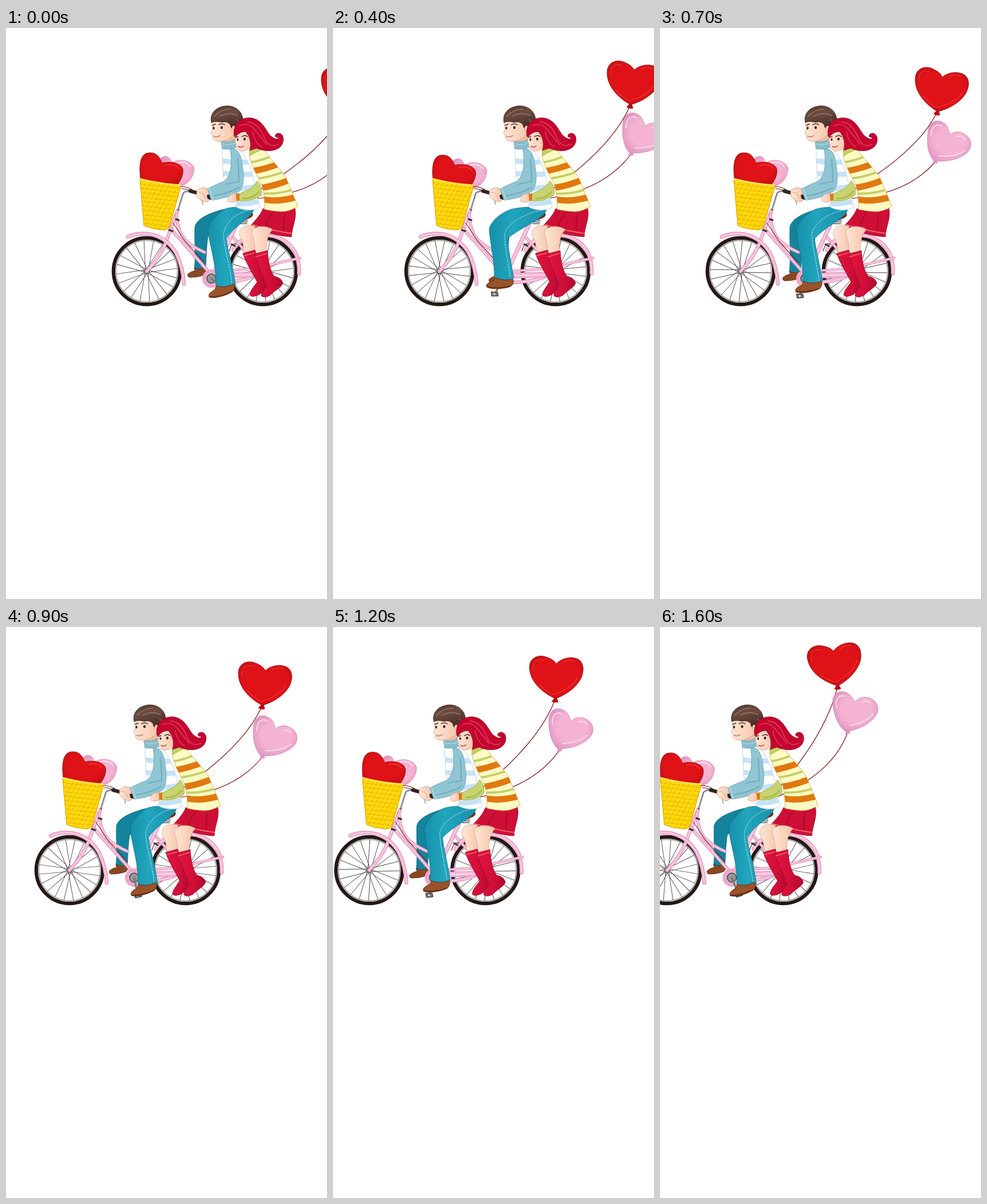
Write an HTML page that moves like this. It is 561 px wide and 998 px high and loops after 1.7 s.

```html
<!DOCTYPE html>
<html lang="en">
<head>
<meta charset="utf-8">
<title>Bicycle ride</title>
<style>
html, body { margin: 0; width: 100%; height: 100%; overflow: hidden; background: #fff; }
svg { display: block; width: 100vw; height: 100vh; }
</style>
</head>
<body>
<svg viewBox="0 0 561 998" fill="none" stroke-linecap="round" stroke-linejoin="round">
<defs>
  <radialGradient id="redFill" cx=".5" cy=".45" r=".6"><stop offset=".7" stop-color="#de1217"/><stop offset="1" stop-color="#c01015"/></radialGradient>
  <radialGradient id="pinkFill" cx=".52" cy=".48" r=".6"><stop offset=".55" stop-color="#f5b3d3"/><stop offset="1" stop-color="#e096c1"/></radialGradient>
  <linearGradient id="jeans"><stop offset="0" stop-color="#1591ab"/><stop offset=".4" stop-color="#22a5bd"/><stop offset="1" stop-color="#1890aa"/></linearGradient>
  <linearGradient id="boot"><stop offset="0" stop-color="#e0163f"/><stop offset=".6" stop-color="#d00d38"/><stop offset="1" stop-color="#ad0a2e"/></linearGradient>
  <linearGradient id="skin" x2="1"><stop offset="0" stop-color="#fee6d6"/><stop offset="1" stop-color="#f6c3a8"/></linearGradient>
  <linearGradient id="hairM" x2=".3" y2="1"><stop offset="0" stop-color="#54382f"/><stop offset=".4" stop-color="#6b4c40"/><stop offset="1" stop-color="#412821"/></linearGradient>
  <clipPath id="basketClip"><path d="M69 264Q105 273 141 275L121 347Q118 353 109 353Q88 351 76 345Z"/></clipPath>
  <clipPath id="knitClip"><path id="knit" d="M260 221Q272 214 285 211C294 227 314 245 324 261Q335 286 345 312Q330 321 316 321Q300 320 287 317Q288 297 283 277C276 259 264 245 260 221Z"/></clipPath>
  <clipPath id="vestClip"><path id="vest" d="M213 209L238 208C256 222 266 250 270 275L278 313C268 321 246 319 236 312L243 288L222 268L215 262Z"/></clipPath>
  <g id="wheel">
    <circle r="58.2" stroke="#231815" stroke-width="6.2"/>
    <circle r="53.8" stroke="#a9a5a4" stroke-width="2"/>
  </g>
</defs>
<g id="ride">
  <path id="redString" stroke="#7d1214" stroke-width="1.2"/>
  <path id="pinkString" stroke="#7d1214" stroke-width="1.2"/>
  <g id="redBalloon">
    <path d="M405 124L400 131Q406 134 412 132L409 124Z" fill="#b80f15"/>
    <path d="M407 126C389 118 363 99 362 72C361 55 377 47 392 53C401 56 406 60 409 65C416 57 430 53 440 55C453 57 458 68 455 82C451 101 430 118 407 126Z" fill="url(#redFill)" stroke="#8f1a16" stroke-width=".8"/>
    <path d="M369 76C366 61 376 55 387 59M421 63Q433 56 441 61M379 101Q390 114 405 119Q436 108 447 88" stroke="#f0473f" stroke-width="1.5" opacity=".6"/>
  </g>
  <g id="pinkBalloon">
    <path d="M414 216L411 222Q416 224 421 220L418 216Z" fill="#e295bf"/>
    <path d="M413 217C401 206 397 186 398 166C399 149 412 143 424 150C432 154 434 163 437 169C444 161 456 161 465 167C478 175 477 190 469 198C456 211 435 218 413 217Z" fill="url(#pinkFill)" stroke="#cf83ae" stroke-width=".8"/>
    <path d="M404 174C402 158 413 151 421 156M449 171Q459 168 464 175M465 194Q452 207 421 208" stroke="#fbd9ea" stroke-width="2"/>
  </g>

  <use href="#wheel" x="81" y="425"/><g class="spokes" data-x="81"></g>
  <use href="#wheel" x="284" y="425"/><g class="spokes" data-x="284"></g>
  <path id="farLeg" fill="#14839b" stroke="#0d6b80" stroke-width=".8"/>
  <g id="farShoe"><path d="M165 423Q174 428 184 423Q187 432 181 436Q170 440 156 440Q151 438 153 434Q157 430 165 428Z" fill="#8a4724" stroke="#5f2c14" stroke-width=".8"/></g>

  <g id="frame"></g>
  <path d="M227 333C234 328 250 327 265 323Q270 327 262 332Q247 338 229 341Q224 338 227 333Z" fill="#742c1c"/>
  <path d="M244 336h13M243 339h14M244 342h12" stroke="#555" stroke-width="1.4"/>
  <circle cx="194" cy="438" r="13" fill="#ddd" stroke="#efa5cb" stroke-width="6"/>
  <circle cx="194" cy="438" r="8" fill="#999" stroke="#555" stroke-width="2"/>
  <path id="crank" stroke="#777" stroke-width="3"/>
  <g id="pedal"><path d="M-6 -3L5 -4L7 2L-4 4Z" fill="#777" stroke="#444" stroke-width="1.5"/><circle r="2" fill="#ccc"/></g>

  <g id="cargo">
    <path d="M103 231C109 221 122 222 125 236C135 227 159 230 164 245C163 262 154 271 143 276L110 262Z" fill="url(#pinkFill)" stroke="#d58bb5" stroke-width=".7"/>
    <path d="M134 236Q150 231 157 242" stroke="#fbd9ea" stroke-width="2.5"/>
    <path d="M70 264C67 240 69 218 86 218C98 217 104 226 108 236C120 232 140 235 144 246C146 257 140 267 134 275Z" fill="url(#redFill)" stroke="#9a1712" stroke-width=".8"/>
    <path d="M115 240Q131 236 138 246" stroke="#ee433c" stroke-width="1.3"/>
  </g>
  <g clip-path="url(#basketClip)"><path d="M60 255h90v105h-90z" fill="#ffd90a"/><g id="weave"></g></g>
  <path d="M69 264Q105 273 141 275L121 347Q118 353 109 353Q88 351 76 345Z" stroke="#e0a500" stroke-width="1.2"/>
  <path d="M70 264Q105 273 140 275" stroke="#ffe34b" stroke-width="3"/>

  <path d="M140 277Q153 277 162 284M142 281Q152 281 160 286" stroke="#701b1c" stroke-width="1.2"/>
  <path d="M136 318L145 289Q150 284 163 285L184 292" stroke="#666" stroke-width="3"/>
  <path d="M137 316L146 289Q150 285 163 285" stroke="#ddd" stroke-width="1.2"/>
  <path d="M157 285L168 288M189 294L196 297" stroke="#2b2523" stroke-width="6"/>
  <path d="M177 300L179 308" stroke="#999" stroke-width="1.5"/>

  <path id="nearLeg" fill="url(#jeans)" stroke="#0f7289" stroke-width=".8"/>
  <path id="seam" stroke="#b9e3ea" stroke-width="1" stroke-dasharray="3 2"/>
  <g id="nearShoe">
    <path d="M189 443Q204 449 219 443Q222 451 216 456C206 461 184 465 175 461C171 456 177 452 185 449Z" fill="#9a5229" stroke="#5f2c14" stroke-width=".9"/>
    <path d="M174 460Q194 463 215 456" stroke="#58270f" stroke-width="1.6"/>
  </g>

  <use href="#vest" fill="#fff" stroke="#a9cbe0" stroke-width=".8"/>
  <g clip-path="url(#vestClip)">
    <path d="M205 230Q235 238 275 232M205 253Q240 258 280 254M225 280Q250 283 285 274M225 305Q250 312 285 300" stroke="#c6e2f5" stroke-width="9" stroke-linecap="butt"/>
  </g>
  <path d="M207 181L236 175L237 200L212 200Z" fill="#f3bd9f"/>
  <path d="M211 197Q224 202 236 194L239 208Q226 214 213 211Z" fill="#86bccb" stroke="#6aa2b3" stroke-width=".8"/>
  <path d="M214 203Q225 206 236 201" stroke="#a8d4df" stroke-width="1.5"/>
  <path d="M195 160Q194 170 196 176L193 184L196 187Q195 194 201 197Q215 201 229 191L239 178L237 160Q215 150 195 160Z" fill="url(#skin)" stroke="#d99a7c" stroke-width=".8"/>
  <path d="M194 165C190 151 201 137 221 136C239 136 250 149 249 163Q247 176 238 181L234 175Q228 178 227 169Q221 162 212 165Q202 162 194 165Z" fill="url(#hairM)" stroke="#3f2821" stroke-width=".8"/>
  <path d="M199 154Q212 141 227 142M209 154Q226 146 240 153M238 160Q243 163 242 170" stroke="#a68a7c" stroke-width="1.4" opacity=".7"/>
  <ellipse cx="233" cy="176" rx="3.2" ry="5" fill="#f8cdb3" stroke="#d99a7c" stroke-width=".7"/>
  <path d="M196 170L201 168M207 169Q212 166 217 169" stroke="#4a2f27" stroke-width="1.7"/>
  <ellipse cx="198" cy="175" rx="1.6" ry="2.4" fill="#33201a"/><ellipse cx="212" cy="174" rx="2.1" ry="2.5" fill="#33201a"/>
  <path d="M198 189Q203 192 209 188" stroke="#c4543f" stroke-width="1.3"/>

  <path d="M169 284Q177 276 188 281L194 292Q194 302 184 304Q170 299 168 292Z" fill="url(#skin)" stroke="#d99a7c" stroke-width=".9"/>
  <path d="M186 292L193 290Q200 291 199 298Q193 302 187 298Z" fill="#2b2523"/>
  <path d="M171 287Q181 286 183 298" stroke="#e0a285" stroke-width="1"/>
  <path d="M227 212C240 208 246 222 248 240C251 259 252 276 242 286C227 296 207 299 194 301L187 281Q203 273 216 268C230 258 230 232 227 212Z" fill="#90c5d3" stroke="#6ba3b4" stroke-width=".9"/>
  <path d="M240 229Q242 250 242 269Q229 270 219 273M242 279Q223 289 196 294" stroke="#73adbd" stroke-width="2.2"/>
  <path d="M190 281L197 300" stroke="#a8d4df" stroke-width="3"/>

  <path d="M284 316Q313 323 340 315C344 333 335 345 334 365C310 364 286 356 260 348C270 337 280 327 284 316Z" fill="#ce0f36" stroke="#920b27" stroke-width=".8"/>
  <path d="M266 344Q298 354 334 359" stroke="#e9656a" stroke-width="2"/>
  <path d="M300 325Q291 337 289 346M322 326Q319 342 320 353" stroke="#a90a2b" stroke-width="2"/>
  <path d="M243 361C242 348 254 342 270 346L276 389L251 392Q251 378 243 361Z" fill="url(#skin)" stroke="#dfa286" stroke-width=".8"/>
  <path d="M264 358C267 345 288 344 301 352Q289 364 290 391L270 394Q271 376 264 358Z" fill="url(#skin)" stroke="#dfa286" stroke-width=".8"/>
  <path d="M249 394L270 388C275 405 285 425 292 436C295 450 285 463 275 467C268 470 262 470 261 466C262 458 270 450 274 444C264 425 254 410 249 394Z" fill="url(#boot)" stroke="#950a28" stroke-width=".8"/>
  <path d="M269 395L292 389C293 408 297 426 304 434Q316 436 319 446C316 454 304 459 297 467C290 471 284 471 281 468C281 461 287 456 290 450C283 430 274 413 269 395Z" fill="url(#boot)" stroke="#950a28" stroke-width=".8"/>
  <path d="M251 398L270 393M271 400L291 394" stroke="#f0636f" stroke-width="1.4"/>

  <use href="#knit" fill="#fffac4" stroke="#c9a944" stroke-width=".8"/>
  <g clip-path="url(#knitClip)" stroke-linecap="butt">
    <path d="M260 251Q286 248 318 235M270 280Q300 279 336 263M282 299Q312 306 350 293" stroke="#e0780f" stroke-width="11"/>
    <path d="M255 236Q280 233 306 221M265 264Q295 262 326 249M280 289Q312 292 345 279" stroke="#c4cf68" stroke-width="4"/>
  </g>
  <path d="M260 213L275 204L283 212Q273 216 262 223Z" fill="#c3ce61" stroke="#a2ad45" stroke-width=".8"/>
  <path d="M239 290Q228 288 224 295L222 302Q229 307 239 302Z" fill="url(#skin)" stroke="#d99a7c" stroke-width=".8"/>
  <path d="M243 290C254 284 268 281 274 267Q284 278 281 292Q266 304 243 302Z" fill="#c8d46e" stroke="#99a443" stroke-width=".9"/>
  <path d="M250 298Q268 298 277 286" stroke="#aebb52" stroke-width="3"/>
  <path d="M237 290L243 289L243 302L238 302Z" fill="#e0780f"/>

  <path d="M237 180L236 191L235 199L237 202Q236 209 241 213Q252 219 263 208L270 185Q254 166 237 180Z" fill="url(#skin)" stroke="#d99a7c" stroke-width=".8"/>
  <path d="M234 189C230 167 246 156 262 157C282 159 288 177 296 187C304 195 312 196 311 191C304 193 303 184 312 184C322 185 322 201 314 208C302 218 284 215 273 210L261 214Q266 196 254 181Q245 181 239 187L236 191Z" fill="#c4052f" stroke="#840923" stroke-width=".8"/>
  <path d="M243 171Q259 164 270 178T291 204M257 164Q276 166 285 189T311 203M266 181Q269 200 282 208" stroke="#e64663" stroke-width="1.3"/>
  <path d="M237 191L241 190M247 190Q253 186 257 190" stroke="#5c2422" stroke-width="1.4"/>
  <ellipse cx="240" cy="195" rx="1.5" ry="2.3" fill="#33201a"/><ellipse cx="252" cy="194" rx="2" ry="2.5" fill="#33201a"/>
  <path d="M241 207Q246 210 250 206" stroke="#c93b48" stroke-width="1.5"/>
</g>
</svg>
<script>
const $ = id => document.getElementById(id);
const move = (el, x, y, turn = 0, cx = 0, cy = 0) =>
  el.setAttribute('transform', `translate(${x} ${y}) rotate(${turn} ${cx} ${cy})`);
const path = (el, d) => el.setAttribute('d', d);

// Pink tubes: dark edge, body, highlight.
const tubes = [
  ['M81 425Q103 402 113 378L135 319', 5],
  ['M48 365Q65 357 90 361Q117 368 132 393Q144 417 146 447', 5.5],
  ['M133 326C135 361 146 376 182 392', 4.5],
  ['M123 351L190 427', 4.5],
  ['M194 438L237 345', 6],
  ['M232 366L284 425', 4],
  ['M232 388Q244 363 284 362Q324 362 341 393Q348 411 347 429', 5.5],
  ['M207 425L265 421L349 402', 3.5],
  ['M202 445Q246 444 267 434L284 425', 5],
  ['M204 433L265 431', 9]
];
$('frame').innerHTML = tubes.map(([d, w]) =>
  [['#cf7da7', w + 1.2], ['#f4b3d3', w], ['#fbd8e9', w / 4]]
    .map(([c, s]) => `<path d="${d}" stroke="${c}" stroke-width="${s}"/>`).join('')).join('') +
  '<path d="M127 341L149 374L182 410M225 390Q230 373 238 378" stroke="#7d2524" stroke-width="1.2"/>' +
  '<path d="M120 353L126 355M132 334L137 336M229 378L235 381" stroke="#333" stroke-width="3"/>';

let weave = '';
for (let row = 0; row < 11; row++)
  for (let col = 0; col < 11; col++) {
    const x = 66 + col * 8 + (row % 2) * 4;
    const y = 272 + row * 7.6 + (x - 69) * .12;
    weave += `M${x} ${y}q2 2 5 .8v-3`;
  }
$('weave').innerHTML = `<path d="${weave}" stroke="#e3aa00" stroke-width="1.2"/>`;

const spokes = [...document.querySelectorAll('.spokes')];
for (const g of spokes) {
  let d = '';
  for (let i = 0; i < 20; i++) {
    const a = i * Math.PI / 10, b = a + (i % 2 ? .6 : -.6);
    d += `M${4 * Math.cos(b)} ${4 * Math.sin(b)}L${53 * Math.cos(a)} ${53 * Math.sin(a)}`;
  }
  g.innerHTML = `<path d="${d}" stroke="#4b4644" stroke-width=".9"/><circle r="5" fill="#888" stroke="#555"/><circle r="2" fill="#ddd"/>`;
}

// time, ride x, red x y, pink x y, tilt, near foot x y, far foot x y, crank angle, cargo y
const keys = [
  [0, 165, 424, 148, 421, 234, 6, 15, 7, 0, -4, 51, 0],
  [400, 105, 414, 136, 416, 220, 4, -10, -6, 15, 5, -32, 4],
  [700, 60, 424, 148, 421, 234, 6, 3, 0, 2, 2, -18, 0],
  [900, 30, 417, 139, 418, 227, 3, 14, 6, -2, -8, 11, 0],
  [1100, 0, 406, 128, 416, 219, 0, 0, 0, 0, 0, -24, 0],
  [1400, -53, 405, 126, 409, 206, -2, 5, 2, -3, -3, 2, 2],
  [1600, -68.5, 378.5, 105, 396.5, 184, -9, 16, 6, -2, -8, 21, 2]
];
const LOOP = 1700, STEP = 100;

function poseAt(t) {
  let i = keys.length - 1;
  while (keys[i][0] > t) i--;
  const a = keys[i], b = keys[i + 1] || a;
  const f = b === a ? 0 : (t - a[0]) / (b[0] - a[0]);
  return a.map((v, n) => v + (b[n] - v) * f);
}

function draw(t) {
  const [, x, rx, ry, px, py, tilt, nx, ny, fx, fy, turn, bob] = poseAt(t);
  move($('ride'), x, 0);
  move($('redBalloon'), rx - 406, ry - 128, tilt, 406, 128);
  move($('pinkBalloon'), px - 416, py - 219, tilt, 416, 219);
  path($('redString'), `M271 287Q${390 + (rx - 424) * .7} ${216 + (ry - 148) * .63} ${rx} ${ry}`);
  path($('pinkString'), `M271 298Q371 ${292 + (py - 234) * .74} ${px} ${py}`);
  for (const g of spokes) move(g, +g.dataset.x, 425, x * .95);
  move($('cargo'), 0, bob);

  // Thigh and shin follow the foot, the knee a little less.
  const k = nx * .8;
  path($('nearLeg'), `M269 314C258 312 225 312 ${210 + k * .5} 317C${194 + k} 324 ${177 + k} 340 ${176 + k} 353` +
    `C${178 + k} 378 ${188 + nx} 412 ${187 + nx} ${443 + ny}Q${204 + nx} ${449 + ny} ${221 + nx} ${443 + ny}` +
    `C${217 + nx} 415 ${209 + k} 385 ${208 + k} 368C${225 + k * .5} 350 250 340 265 324Z`);
  path($('seam'), `M262 318C237 322 ${208 + k} 339 ${203 + k} 359C${203 + k} 383 ${212 + nx} 415 ${215 + nx} ${442 + ny}`);
  move($('nearShoe'), nx, ny, -nx * .5, 197, 453);
  path($('farLeg'), `M215 317C195 322 ${168 + fx} 332 ${165 + fx} 348C${164 + fx} 375 ${167 + fx} 400 ${164 + fx} ${425 + fy}` +
    `Q${174 + fx} ${429 + fy} ${184 + fx} ${424 + fy}C${185 + fx} 405 ${185 + fx} 385 ${188 + fx} 364L215 335Z`);
  move($('farShoe'), fx, fy);

  const a = turn * Math.PI / 180;
  const cx = 194 + 32 * Math.sin(a), cy = 438 + 32 * Math.cos(a);
  path($('crank'), `M194 438L${cx} ${cy}`);
  move($('pedal'), cx, cy, -turn * .3);
}

const start = performance.now();
function tick() {
  const t = (performance.now() - start) % LOOP;
  draw(Math.floor(t / STEP) * STEP);
  requestAnimationFrame(tick);
}
draw(0);
requestAnimationFrame(tick);
</script>
</body>
</html>
```
